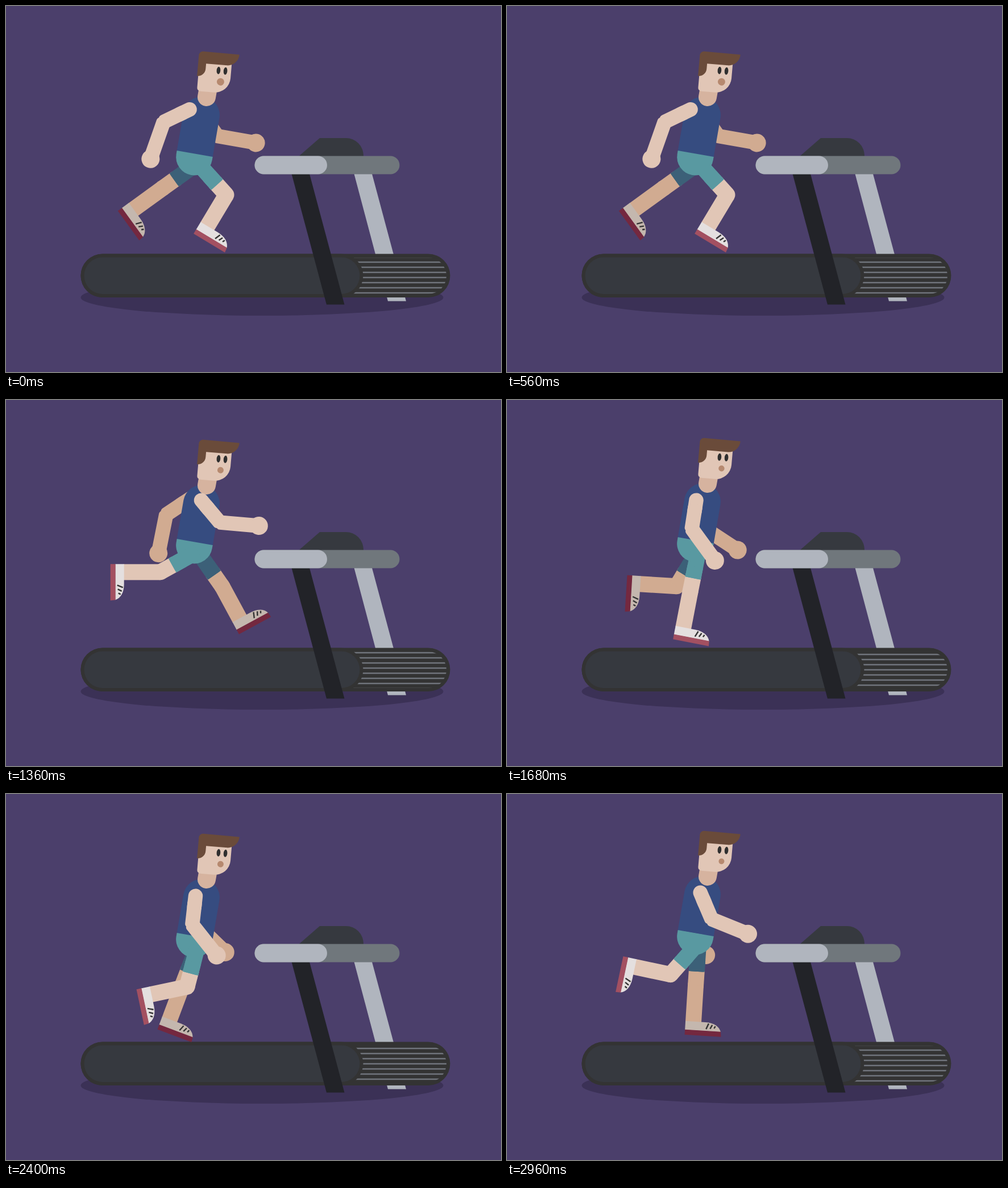
Recreate the animation shown at these times as an HTML page. Size 871 by 643 pixels, loop 3.04 s.

```html
<!DOCTYPE html>
<html lang="en">
<head>
<meta charset="utf-8">
<title>Treadmill runner</title>
<style>
  html, body { margin: 0; width: 100%; height: 100%; overflow: hidden; background: #4b3f6b; }
  svg { display: block; width: 871px; height: 643px; }
  .far { --skin: #d1ab91; --shorts: #3c6078; --shoe: #c4b7ae; --sole: #74283f; }
  .near { --skin: #e1c6b6; --shorts: #5999a1; --shoe: #e4dfdf; --sole: #a35061; }
  .skin { fill: var(--skin); }
  .shorts { fill: var(--shorts); }
  .shoe { fill: var(--shoe); }
  .sole { fill: var(--sole); }
  .laces { fill: none; stroke: #333; stroke-width: 2.4; }
  .stripes { stroke: #70747c; stroke-width: 2.4; }
</style>
</head>
<body>
<svg viewBox="0 0 871 643">
  <defs>
    <clipPath id="vent"><path d="M600 442H743a32 32 0 0 1 0 64H600Z"/></clipPath>
    <g id="arm" class="skin">
      <rect x="-12.75" y="0.5" width="25.5" height="45" rx="12.75"/>
      <rect x="-12.75" y="20" width="25.5" height="49.4" rx="6"/>
      <g transform="translate(0 64) rotate(-45)">
        <rect x="-12.75" y="-5.4" width="25.5" height="74" rx="6"/>
        <circle cy="69" r="16"/>
      </g>
    </g>
    <g id="thigh">
      <rect class="skin" x="-14" y="45" width="28" height="30"/>
      <rect class="shorts" x="-14" width="28" height="51" rx="4"/>
      <rect class="shorts" x="-14" y="30" width="28" height="21"/>
    </g>
    <g id="shin">
      <circle class="skin" r="14"/>
      <rect class="skin" x="-14" width="28" height="65"/>
      <g transform="translate(-14 64)">
        <path class="shoe" d="M0 0H35C50 0 60 6 63 15.5H0Z"/>
        <path class="sole" d="M0 15H63L64 24H0Z"/>
        <path class="laces" d="M37 12L41 2M44 11L47.5 4M51 10L53 6"/>
      </g>
    </g>
  </defs>

  <rect width="871" height="643" fill="#4b3f6b"/>
  <ellipse cx="450.5" cy="512" rx="319" ry="32" fill="#3b3156"/>
  <path d="M612 293H643.5L704 518.5H672Z" fill="#b0b5be"/>
  <rect x="131.5" y="435.5" width="650" height="76.5" rx="38.25" fill="#333"/>
  <g clip-path="url(#vent)"><g id="stripes" class="stripes"></g></g>
  <rect x="131.5" y="435.5" width="497" height="76.5" rx="38.25" fill="#333"/>
  <rect x="137.5" y="441.5" width="485" height="64.5" rx="32.25" fill="#36393f"/>
  <path d="M502 293H533.5L595.5 524.5H564Z" fill="#222328"/>
  <path d="M514 265L552 232H598A31 31 0 0 1 629 263V265Z" fill="#36393f"/>
  <rect x="437.5" y="263.5" width="255" height="32" rx="16" fill="#70777c"/>
  <rect x="437.5" y="263.5" width="127.5" height="32" rx="16" fill="#b0b5be"/>

  <g id="runner">
    <g class="far">
      <use href="#arm" id="farArm"/>
      <use href="#shin" id="farShin"/>
      <use href="#thigh" id="farThigh"/>
    </g>
    <g transform="translate(332.2 244.5) rotate(9.8)">
      <path d="M-32 .5V-69a32 32 0 0 1 64 0V.5Z" fill="#364c80"/>
      <path d="M-32 0H32V6a32 32 0 0 1 -64 0Z" fill="#5999a1"/>
    </g>
    <g class="near">
      <use href="#shin" id="nearShin"/>
      <use href="#thigh" id="nearThigh"/>
    </g>
    <path d="M353 145L356 128" stroke="#d6b39f" stroke-width="32" stroke-linecap="round"/>
    <g transform="translate(340 64.2) rotate(5)">
      <path d="M2 10H59V43A27 27 0 0 1 32 70H8A6 6 0 0 1 2 64Z" fill="#e1c6b6"/>
      <path d="M7 0H71A20.5 20.5 0 0 1 51 20.8H14V30A14 14 0 0 1 0 44V7A7 7 0 0 1 7 0Z" fill="#6a4b3a"/>
      <g fill="#2f2f2f">
        <ellipse cx="36.8" cy="30.9" rx="3.3" ry="6.5"/>
        <ellipse cx="49" cy="30.9" rx="3.3" ry="6.5"/>
      </g>
      <circle id="mouth" cx="42" cy="50.5" r="5" fill="#b6896f"/>
    </g>
    <g class="near"><use href="#arm" id="nearArm"/></g>
  </g>
</svg>
<script>
const STEP = 80, STEPS = 38;
const SHOULDER = [335, 161], HIP = [337.3, 261], THIGH = 75;
const $ = id => document.getElementById(id);

// Smooth periodic curve through points (xs, ys).
function curve(xs, ys, period) {
  const n = xs.length;
  const X = k => xs[((k % n) + n) % n] + Math.floor(k / n) * period;
  const Y = k => ys[((k % n) + n) % n];
  const slope = k => (Y(k + 1) - Y(k - 1)) / (X(k + 1) - X(k - 1));
  return x => {
    x = ((x - xs[0]) % period + period) % period + xs[0];
    let k = n - 1;
    while (xs[k] > x) k--;
    const w = X(k + 1) - X(k), u = (x - X(k)) / w, v = 1 - u;
    return v * v * (1 + 2 * u) * Y(k) + u * u * (1 + 2 * v) * Y(k + 1)
      + w * u * v * (v * slope(k) - u * slope(k + 1));
  };
}

// Linear interpolation between points.
function ramp(xs, ys) {
  return x => {
    let k = xs.length - 2;
    while (k > 0 && xs[k] > x) k--;
    return ys[k] + (ys[k + 1] - ys[k]) * (x - xs[k]) / (xs[k + 1] - xs[k]);
  };
}

// Joint angles over one full stride, in degrees forward from straight down.
const half = [18, 34, 67, 95, 139, 166];
const stride = [...half, ...half.map(p => p + 180)];
const armAngle = curve(stride, [40, 43, 23, -6.5, -50, -64.4, -56.3, -41, -16.3, 1, 26, 35], 360);
const thighAngle = curve(stride, [-61, -62.5, -41.5, -14.5, 29, 42, 35, 22, -4, -21, -48, -54.5], 360);
const shinAngle = curve(stride, [-90, -107, -102, -78, -43, -31, 28.5, 21.3, -3.6, -20.5, -46, -54], 360);
const bounce = curve([18, 34, 50, 67, 95, 139, 166], [5, 0, -3, 0, 5, 12.5, 15], 180);

// Pace of the stride and of the belt vents.
const beats = [0, 7, 11, 17, 25, 30, 37];
const phaseAt = ramp(beats, [166, 526, 754, 1098, 1579, 1895, 2227]);
const ventAt = ramp(beats, [0, 15, 24, 37, 56, 68, 84]);

for (let y = 441; y < 520; y += 9) {
  $('stripes').innerHTML += `<path d="M600 ${y}H790"/>`;
}

function place(id, x, y, angle) {
  $(id).setAttribute('transform', `translate(${x} ${y}) rotate(${-angle})`);
}

function poseSide(side, phase) {
  const thigh = thighAngle(phase), a = thigh * Math.PI / 180;
  place(side + 'Arm', ...SHOULDER, armAngle(phase));
  place(side + 'Thigh', ...HIP, thigh);
  place(side + 'Shin', HIP[0] + THIGH * Math.sin(a), HIP[1] + THIGH * Math.cos(a), shinAngle(phase));
}

function draw(now) {
  const step = Math.floor(now / STEP) % STEPS;
  const phase = phaseAt(step), y = bounce(phase);
  poseSide('near', phase);
  poseSide('far', phase + 180);
  $('runner').setAttribute('transform', `translate(0 ${y})`);
  $('mouth').setAttribute('r', 5 + Math.max(0, y) * 0.1);
  const vent = Math.round(ventAt(step)) % 3 * 3;
  $('stripes').setAttribute('transform', `translate(0 ${vent > 3 ? vent - 9 : vent})`);
}

const start = performance.now();
function loop() {
  draw(performance.now() - start);
  requestAnimationFrame(loop);
}
loop();
</script>
</body>
</html>
```
